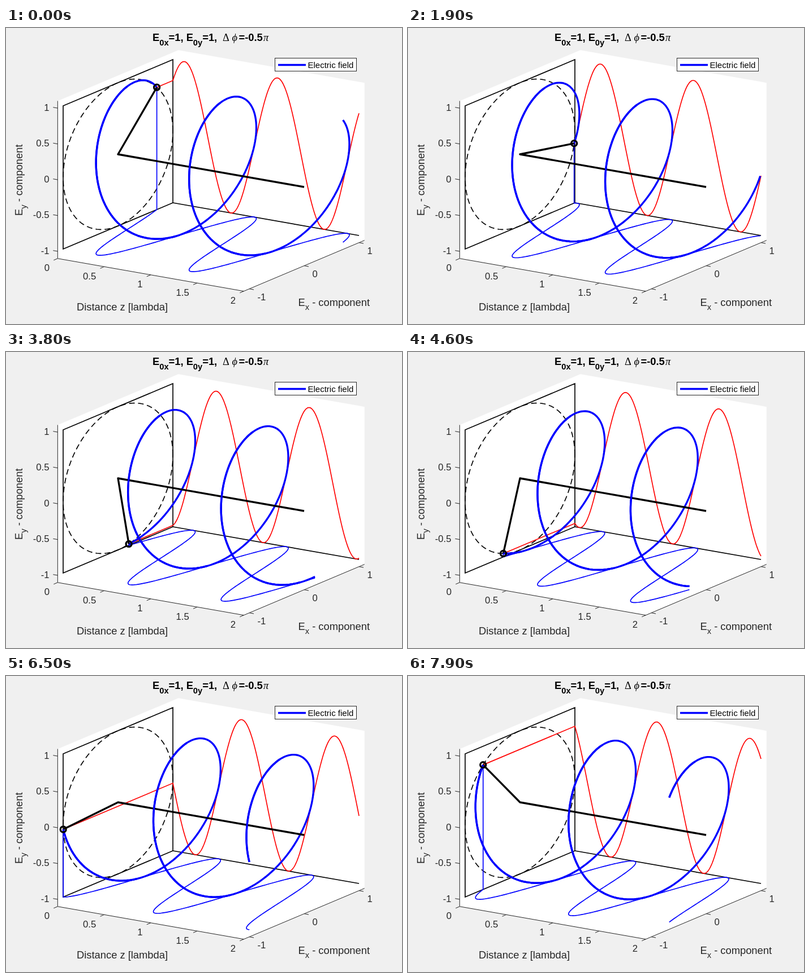
These frames come from a looping animation (700 by 525 pixels, 8 s). An HTML page:

```html
<!DOCTYPE html>
<html lang="en">
<head>
<meta charset="utf-8">
<title>Circular polarization</title>
<style>
html, body { margin: 0; width: 100%; height: 100%; overflow: hidden; background: #f0f0f0; }
svg { display: block; width: 700px; height: 525px; font-family: "Liberation Sans", Arial, sans-serif; fill: #262626; }
path, line, circle { fill: none; }
.tick { font-size: 16.67px; }
.label { font-size: 18.33px; }
.title { font-size: 18.33px; font-weight: bold; fill: #000; }
.sub { font-size: 14.67px; }
.greek { font-family: "Liberation Serif", "DejaVu Serif", serif; font-weight: normal; }
.it { font-style: italic; }
.axis { stroke: #262626; stroke-width: 1; }
.thin { stroke-width: 1.67; }
.thick { stroke-width: 3.33; stroke-linejoin: round; }
.black { stroke: #000; }
.blue { stroke: #00f; }
.red { stroke: #f00; }
</style>
</head>
<body>
<svg viewBox="0 0 700 525">
  <path id="box" style="fill:#fff"/>
  <path id="axes" class="axis"/>
  <g id="ticks" class="tick"></g>
  <path id="frame" class="thin black"/>
  <path id="ring" class="thin black" stroke-dasharray="10 6"/>
  <path id="wall" class="thin red"/>
  <path id="floor" class="thin blue"/>
  <path id="helix" class="thick blue"/>
  <path id="arm" class="thick black"/>
  <path id="near" class="thick blue"/>
  <circle id="head" class="thick black" r="5"/>

  <text class="title" x="259" y="23">E<tspan class="sub" dy="8">0x</tspan><tspan dy="-8">=1, E</tspan><tspan class="sub" dy="8">0y</tspan><tspan dy="-8">=1,</tspan><tspan class="greek" x="383">Δ</tspan><tspan class="greek it" x="399.5">ϕ</tspan><tspan x="411.5">=-0.5</tspan><tspan class="greek it" x="455">π</tspan></text>
  <text class="label" x="205.5" y="501" text-anchor="middle">Distance z [lambda]</text>
  <text class="label" x="516.5" y="493">E<tspan class="sub" dy="7">x</tspan><tspan dy="-7"> - component</tspan></text>
  <text class="label" transform="translate(29 333) rotate(-90)">E<tspan class="sub" dy="7">y</tspan><tspan dy="-7"> - component</tspan></text>

  <rect x="475.5" y="53.5" width="144" height="23" fill="#fff" class="axis"/>
  <line x1="481" y1="65.5" x2="530" y2="65.5" class="thick blue"/>
  <text x="533.5" y="71" font-size="15" fill="#000">Electric field</text>
</svg>
<script>
const $ = id => document.getElementById(id);
const TAU = 2 * Math.PI, SAMPLES = 240, LIM = 1.1;

// Orthographic view of (z, x, y)
const project = (z, x, y) => [198 + 164.5 * z + 97 * x, 224 + 29 * z - 41 * x - 127 * y];
const pt = (...p) => project(...p).map(v => v.toFixed(2)).join(" ");
const poly = points => "M" + points.map(p => pt(...p)).join("L");
const draw = (id, d) => $(id).setAttribute("d", d);
const sample = f => Array.from({ length: SAMPLES + 1 }, (_, i) => f(i / SAMPLES));

function addLabel(text, x, y, anchor) {
  const el = document.createElementNS("http://www.w3.org/2000/svg", "text");
  el.setAttribute("x", x);
  el.setAttribute("y", y);
  el.setAttribute("text-anchor", anchor);
  el.textContent = text;
  $("ticks").append(el);
}

function drawStage() {
  const corners = [[0, -LIM, LIM], [0, LIM, LIM], [2, LIM, LIM],
                   [2, LIM, -LIM], [2, -LIM, -LIM], [0, -LIM, -LIM]];
  draw("box", poly(corners) + "Z");
  let d = poly([corners[0], corners[5], corners[4], corners[3]]);
  const tick = (p, dx, dy) => {
    const [x, y] = project(...p);
    d += `M${x} ${y}l${dx} ${dy}`;
  };
  for (let i = 0; i < 5; i++) {
    const v = i / 2, y = v - 1;
    tick([0, -LIM, y], -8, -1.4);
    addLabel(y, 76.5, 273.8 - 127 * y, "end");
    tick([v, -LIM, -LIM], -7, 3);
    addLabel(v, 77 + 82.25 * i, 431 + 14.5 * i, "end");
  }
  for (const x of [-1, 0, 1]) {
    tick([2, x, -LIM], 8, 1.4);
    addLabel(x, 541.5 + 97 * x, 442 - 41 * x, "start");
  }
  draw("axes", d);
  draw("frame", poly([[0, -1, -1], [0, -1, 1], [0, 1, 1], [0, 1, -1]]) + "Z" +
    poly([[0, 1, -1], [2, 1, -1]]));
  draw("ring", poly(sample(u => [0, Math.cos(TAU * u), Math.sin(TAU * u)])));
}

function render(ms) {
  const step = Math.max(0, Math.floor(ms / 100) - 4);
  const phase = TAU * (1 / 8 - step / 99);
  const wave = sample(u => {
    const a = phase + 2 * TAU * u;
    return [2 * u, Math.cos(a), Math.sin(a)];
  });
  const tip = wave[0];

  draw("helix", poly(wave));
  draw("wall", poly([tip, ...wave.map(([z, , y]) => [z, 1, y])]));
  draw("floor", poly([tip, ...wave.map(([z, x]) => [z, x, -1])]));
  draw("arm", poly([tip, [0, 0, 0], [2, 0, 0]]));

  // Parts with x < 0 pass in front of the central axis
  let d = "", open = false;
  for (const p of wave) {
    const front = p[1] < 0;
    if (front) d += (open ? "L" : "M") + pt(...p);
    open = front;
  }
  draw("near", d);

  const [cx, cy] = project(...tip);
  $("head").setAttribute("cx", cx);
  $("head").setAttribute("cy", cy);
}

drawStage();
const start = performance.now();
function loop() {
  render((performance.now() - start) % 8000);
  requestAnimationFrame(loop);
}
loop();
</script>
</body>
</html>
```
